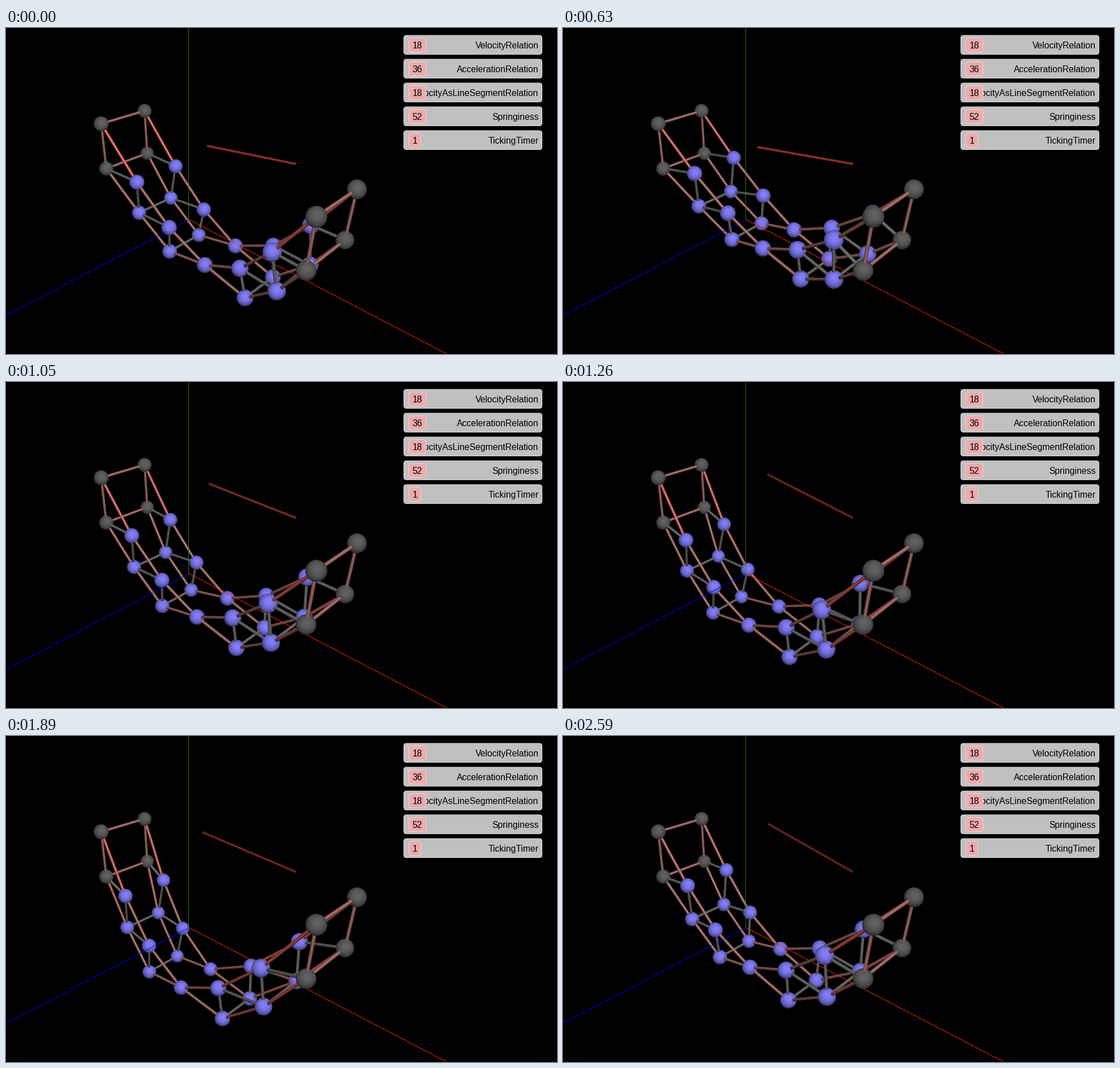
A matplotlib script for the animation above (2.66 s loop, 973x575 px).

```python
import numpy as np
import matplotlib.pyplot as plt
from matplotlib.animation import FuncAnimation
from matplotlib.patches import FancyBboxPatch

W, H, SS = 973, 575, 2
FRAMES, INTERVAL = 38, 70
PX = 0.72                                # one pixel in points at 100 dpi

# Camera looks at the origin from (1, h, 1); depth is 1 at the origin.
CENTER = np.array([323.0, 338.0])
FOCAL, SIN, COS, ROOT2 = 816.0, 0.522, 0.853, 2 ** 0.5
LIGHT = np.array([0.10, -0.20, 0.97])
BALL_R, ROD_R = 13.2, 2.4

BLUE, GRAY = (132, 127, 252), (98, 98, 98)
ROD_PINK, ROD_RED, ROD_GRAY = (np.array(c, float) for c in
                               ((186, 122, 117), (255, 115, 104), (117, 118, 114)))

# The lattice is mirrored in depth: near letters map to far letters.
FAR = dict(zip("ADWZEHILMORSU", "BCXYFGJKNPQTV"))
ANCHORS = {"A": (168, 169), "D": (177, 248), "W": (548, 333), "Z": (530, 428)}
HALF_WIDTH = dict(zip("EHILMORSU",
                      (.057, .049, .053, .046, .048, .052, .045, .059, .053)))
PINK_RODS = "AD AE DH EI HL IM LM MO MR OS RU SW UZ WZ".split()
GRAY_RODS = "DE EH HI IL OR OU SU SZ".split()

KNOTS = np.array([0, 4, 9, 14, 18, 24, 29], float)
PATHS = {
    "E": [(231, 272), (233, 259), (230, 259), (217, 279), (214, 286), (210, 275), (220, 264)],
    "H": [(235, 326), (240, 315), (237, 317), (219, 333), (214, 341), (217, 331), (228, 323)],
    "I": [(288, 352), (291, 328), (288, 332), (266, 362), (254, 377), (256, 357), (269, 342)],
    "L": [(289, 394), (301, 374), (292, 378), (265, 407), (251, 422), (261, 404), (277, 390)],
    "M": [(351, 418), (356, 390), (348, 395), (328, 429), (308, 452), (317, 427), (330, 408)],
    "O": [(413, 424), (420, 400), (408, 393), (394, 433), (377, 452), (379, 430), (394, 413)],
    "R": [(422, 476), (424, 448), (415, 447), (400, 485), (383, 505), (387, 484), (398, 466)],
    "S": [(470, 395), (481, 380), (473, 375), (457, 402), (453, 414), (450, 400), (462, 387)],
    "U": [(478, 464), (486, 452), (472, 443), (465, 472), (456, 481), (457, 470), (466, 460)],
}
TIP_PATH = [(355, 208), (340, 204), (348, 209), (361, 163), (345, 170), (353, 166), (362, 155)]
TIP_END = (512, 240)
PAUSES = (1, 6, 11, 16, 21, 26, 30, 36)


def along(path, t):
    """Smooth cubic through the path's points at the knots."""
    p = np.array(path, float)
    m = np.gradient(p, KNOTS, axis=0)
    i = min(np.searchsorted(KNOTS, t, side="right") - 1, len(KNOTS) - 2)
    h = KNOTS[i + 1] - KNOTS[i]
    q = (t - KNOTS[i]) / h
    return ((1 + 2 * q) * (1 - q) ** 2 * p[i] + q * (1 - q) ** 2 * h * m[i]
            + q * q * (3 - 2 * q) * p[i + 1] + q * q * (q - 1) * h * m[i + 1])


def mirror(point, z):
    """Scale of a near node at depth offset z, and its far twin's place and scale."""
    u, v = np.asarray(point) - CENTER
    k = COS + SIN * SIN / COS
    s = (1 - k * ROOT2 * z) / (1 + (k * u - SIN / COS * v) / FOCAL)
    a = u * s / FOCAL
    b = a + ROOT2 * z
    y = (SIN * b - v * s / FOCAL) / COS
    a2, b2 = b, a
    s2 = 1 - COS * b2 - SIN * y
    far = CENTER + FOCAL / s2 * np.array([a2, SIN * b2 - COS * y])
    return 1 / s, far, 1 / s2


def lattice(t):
    near = {**ANCHORS, **{k: along(p, t) for k, p in PATHS.items()}}
    nodes = {}
    for key, point in near.items():
        w, far, w2 = mirror(point, HALF_WIDTH.get(key, 0.061))
        nodes[key] = (np.array(point, float), w)
        nodes[FAR[key]] = (far, w2)
    return nodes


def view(node):
    p, w = node
    return np.append((p - CENTER) / w, -FOCAL / w)


class Canvas:
    """Colour and nearness buffers, oversampled."""

    def __init__(self, base=None):
        if base is None:
            self.rgb = np.zeros((H * SS, W * SS, 3), np.uint8)
            self.near = np.zeros((H * SS, W * SS), np.float32)
        else:
            self.rgb, self.near = base.rgb.copy(), base.near.copy()

    def window(self, lo, hi):
        x0, y0 = np.maximum(np.floor(lo * SS).astype(int), 0)
        x1, y1 = np.ceil(hi * SS).astype(int) + 1
        box = np.s_[y0:min(y1, H * SS), x0:min(x1, W * SS)]
        y, x = np.mgrid[box]
        return box, (x + 0.5) / SS, (y + 0.5) / SS

    def put(self, box, inside, near, shade, color):
        mask = inside & (near > self.near[box])
        self.near[box][mask] = near[mask]
        self.rgb[box][mask] = np.clip(shade[mask][:, None] * np.asarray(color), 0, 255)

    def ball(self, node, color):
        p, w = node
        r = BALL_R * w
        box, x, y = self.window(p - r, p + r)
        nx, ny = (x - p[0]) / r, (y - p[1]) / r
        nz2 = 1 - nx * nx - ny * ny
        nz = np.sqrt(np.maximum(nz2, 0))
        lit = np.maximum(nx * LIGHT[0] + ny * LIGHT[1] + nz * LIGHT[2], 0)
        self.put(box, nz2 > 0, w + w * w * BALL_R / FOCAL * nz, 0.36 + 0.64 * lit, color)

    def rod(self, start, end, color, radius=ROD_R):
        (p, w0), (q, w1) = start, end
        pad = radius * max(w0, w1) + 1
        box, x, y = self.window(np.minimum(p, q) - pad, np.maximum(p, q) + pad)
        d = q - p
        size = np.hypot(*d)
        side = np.array([-d[1], d[0], 0]) / size
        t = ((x - p[0]) * d[0] + (y - p[1]) * d[1]) / size ** 2
        w = w0 + (w1 - w0) * t
        e = ((x - p[0]) * side[0] + (y - p[1]) * side[1]) / (radius * w)
        bulge = np.sqrt(np.maximum(1 - e * e, 0))
        axis = view(end) - view(start)
        axis /= np.linalg.norm(axis)
        front = np.array([0, 0, 1]) - axis * axis[2]
        front /= np.linalg.norm(front)
        lit = np.maximum(e * (side @ LIGHT) + bulge * (front @ LIGHT), 0)
        self.put(box, (abs(e) < 1) & (t >= 0) & (t <= 1),
                 w + w * w * radius / FOCAL * bulge, 0.15 + 0.85 * lit, color)

    def hairline(self, x, y, near, color):
        x, y = np.floor(x).astype(int), np.floor(y).astype(int)
        ok = (x >= 0) & (x < W) & (y >= 0) & (y < H)
        for i in range(SS):
            for j in range(SS):
                self.rgb[y[ok] * SS + i, x[ok] * SS + j] = color
                self.near[y[ok] * SS + i, x[ok] * SS + j] = near[ok]

    def image(self):
        c = self.rgb.astype(np.uint16)
        return ((c[::2, ::2] + c[1::2, ::2] + c[::2, 1::2] + c[1::2, 1::2]) // 4).astype(np.uint8)


def world_axes():
    canvas = Canvas()
    up = np.arange(0, 339)
    canvas.hairline(np.full(up.shape, 322), up, 1 + SIN / COS * (338 - up) / FOCAL, (45, 125, 0))
    left = np.arange(0, 324)
    canvas.hairline(left, 338 + (323 - left) * 169 / 323, 1 + COS * (323 - left) / FOCAL, (0, 0, 245))
    right = np.arange(323, 779)
    canvas.hairline(right, 338 + (right - 323) * 237 / 455, 1 + COS * (right - 323) / FOCAL, (255, 40, 0))
    return canvas


def rod_color(pair, a, b):
    length = np.linalg.norm(view(a) - view(b))
    rest = 75 if pair in ("SW", "UZ") else 100
    pull = np.clip((length / rest - 1) * 4, 0, 1)
    return ROD_PINK + (ROD_RED - ROD_PINK) * pull


def render(t):
    canvas = Canvas(BACKDROP)
    nodes = lattice(t)
    for pair in PINK_RODS + GRAY_RODS:
        for i, j in (pair, (FAR[pair[0]], FAR[pair[1]])):
            a, b = nodes[i], nodes[j]
            canvas.rod(a, b, ROD_GRAY if pair in GRAY_RODS else rod_color(pair, a, b))
    for key in "ADWZHLRU":
        canvas.rod(nodes[key], nodes[FAR[key]], ROD_PINK if key in ANCHORS else ROD_GRAY)
    fixed = set(ANCHORS) | {FAR[k] for k in ANCHORS}
    for key, node in nodes.items():
        canvas.ball(node, GRAY if key in fixed else BLUE)
    tip = along(TIP_PATH, t)
    fade = 1 - 0.005 * (208 - tip[1])
    canvas.rod((tip, 1.0), (np.array(TIP_END, float), 1.0),
               np.array([147, 48, 42]) * fade, 2.2)
    return canvas.image()


def rounded(x, y, w, h, face, edge, z):
    ax.add_patch(FancyBboxPatch((x, y), w, h, boxstyle="round,pad=0,rounding_size=4.5",
                                fc=face, ec=edge, lw=PX, zorder=z))


def panel(row, count, label):
    top = 13 + 42 * row
    style = dict(family="Liberation Sans", size=15.7 * PX, color="black", va="baseline")
    rounded(702.5, top, 244, 33.5, "#c0c0c0", "#d8d8d8", 2)
    ax.text(940.5, top + 22.7, label, ha="right", zorder=3, **style)
    width = 30 if len(count) > 1 else 21
    rounded(711.5, top + 4.5, width, 25, "#eeaaaa", "#f6d2d2", 4)
    ax.text(711.5 + width / 2, top + 22.7, count, ha="center", zorder=5, **style)


BACKDROP = world_axes()
fig = plt.figure(figsize=(W / 100, H / 100), dpi=100, facecolor="black")
ax = fig.add_axes([0, 0, 1, 1])
picture = ax.imshow(BACKDROP.image(), extent=(0, W, H, 0), interpolation="none", aspect="auto")
ax.set_xlim(0, W)
ax.set_ylim(H, 0)
ax.axis("off")

for row, (count, label) in enumerate([
        ("18", "VelocityRelation"), ("36", "AccelerationRelation"),
        ("18", "VelocityAsLineSegmentRelation"), ("52", "Springiness"),
        ("1", "TickingTimer")]):
    panel(row, count, label)


def update(frame):
    step = frame - sum(p <= frame for p in PAUSES)
    picture.set_data(render(step))
    return [picture]


anim = FuncAnimation(fig, update, frames=FRAMES, interval=INTERVAL, repeat=True)
plt.show()
```
